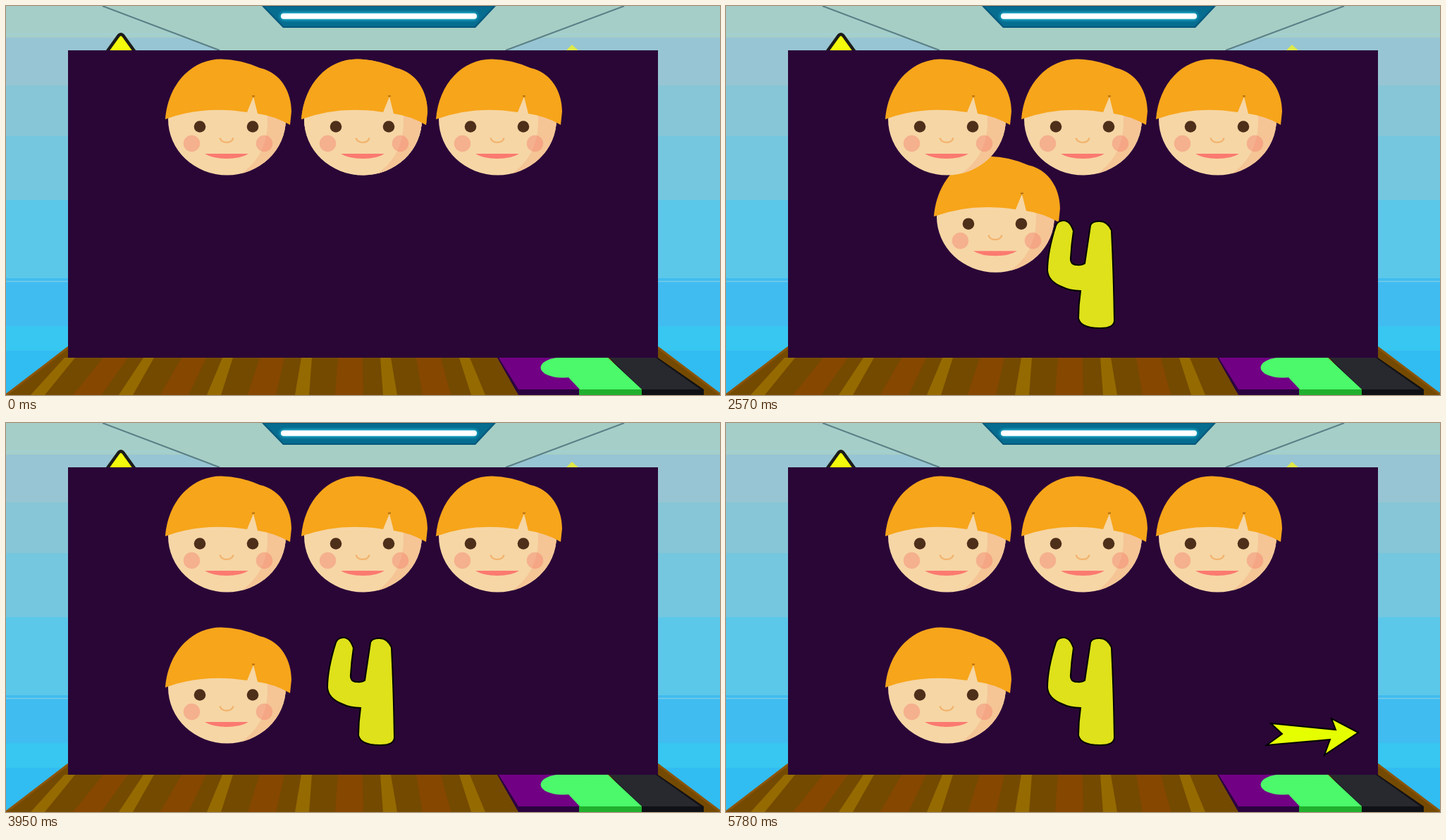
Write an HTML page that moves like this. It is 1013x553 px and loops after 6.58 s.

```html
<!DOCTYPE html>
<html lang="en">
<head>
<meta charset="utf-8">
<title>Counting faces</title>
<style>
  html, body { margin: 0; width: 100%; height: 100%; overflow: hidden; background: #2a0637; }
  svg { display: block; width: 100%; height: 100%; }
</style>
</head>
<body>
<svg viewBox="0 0 1013 553" preserveAspectRatio="none">
  <defs>
    <filter id="glow" x="-10%" y="-150%" width="120%" height="400%"><feGaussianBlur stdDeviation="2"/></filter>
    <clipPath id="skin"><path d="M240 130H387Q397 145 397 161A83.500 79.500 0 0 1 230 161Q230 145 240 130Z"/></clipPath>
    <g id="head">
      <g clip-path="url(#skin)">
        <path d="M226 120H401V245H226Z" fill="#f6d6a5"/>
        <path d="M371 100V165Q371 216 328 242H401V100Z" fill="#f5c596"/>
      </g>
      <path fill="#f7a51a" d="M226 161C230 110 264 75.500 305 75.500Q333 76 360 88C392 95 405 125 405 150L403 169Q380 156 357 153L351 129L342 151Q280 141 226 161Z"/>
      <path d="M349 128h4" stroke="#7a4a18"/>
      <g fill="#4e2f1a"><circle cx="275" cy="171.500" r="8.300"/><circle cx="350" cy="171.500" r="8.300"/></g>
      <g fill="#f5786a" fill-opacity=".4"><circle cx="263.500" cy="195.500" r="11.700"/><circle cx="366.500" cy="195.500" r="11.700"/></g>
      <path d="M303.500 187.500C306 196 320 196 322.500 187.500" fill="none" stroke="#f2b36d" stroke-width="2.400"/>
    </g>
  </defs>

  <g id="wall"></g>
  <path d="M137 0H877L709 63H303Z" fill="#a6cec5"/>
  <path d="M137 0L303 63M877 0L709 63" stroke="#5b7f86" stroke-width="2"/>
  <path d="M363 0H695L666 31H393Z" fill="#04587b"/>
  <path d="M367 1H691L665 29H394Z" fill="#066c90"/>
  <rect x="389" y="9.500" width="280" height="10" rx="5" fill="#25c5de" filter="url(#glow)"/>
  <rect x="390" y="10.500" width="278" height="8" rx="4" fill="#fff"/>
  <path d="M136 75L159 43Q163 37.500 167 43L190 75Z" fill="#f4fa0c" stroke="#1c1c1a" stroke-width="4.500"/>
  <path d="M793 65L803 55L814 65Z" fill="#dfe94a"/>

  <path d="M88 484L0 553H1013L925 484Z" fill="#744a00"/>
  <path d="M88 485.500L0 553M925 485.500L1013 552" stroke="#8a5408" stroke-width="3"/>
  <g id="planks"></g>
  <path d="M697 500L727 553H814V500Z" fill="#2b0340"/>
  <path d="M699 500L727 545H814L800 500Z" fill="#720084"/>
  <path d="M856 500H925L990 545V553H902Z" fill="#101116"/>
  <path d="M856 500H922L985 545H902Z" fill="#28292f"/>
  <path d="M813 545H902V553H813Z" fill="#20b02e"/>
  <path d="M783 500H854L902 545H814L798 528Z" fill="#4bf96a"/>
  <ellipse cx="790" cy="514" rx="31.500" ry="14.500" fill="#4bf96a"/>

  <rect x="88" y="63" width="837" height="437" fill="#2a0637"/>
  <g id="faces"></g>
  <path id="four" fill="#dfe11a" stroke="#000" stroke-width="2"/>
  <path id="arrow" stroke="#000" stroke-width="2"/>
</svg>
<script>
const byId = id => document.getElementById(id);
const clamp = v => Math.max(0, Math.min(1, v));
const LOOP = 6580, STEP = 30, PHASE = 20;

// Each band: top edge and colour, reaching down to the next one
const bands = [[0, '#a5cec8'], [45, '#97c5d3'], [113, '#86c6d6'], [185, '#74c7df'],
  [276, '#5bc8e9'], [387, '#40bcf0'], [455, '#37c7f0'], [490, '#31bcf2']];
byId('wall').innerHTML = bands.map(([y, color]) =>
  `<rect y="${y}" width="1013" height="${553 - y}" fill="${color}"/>`).join('') +
  '<path d="M0 40.500H1013M0 391.500H1013" stroke="#9bd5e2" stroke-opacity=".6" stroke-width="1.500"/>';

function plankRow(count, color, top, topGap, topWidth, bottom, bottomGap, bottomWidth) {
  let d = '';
  for (let i = 0; i < count; i++) {
    const a = top + topGap * i, b = bottom + bottomGap * i;
    d += `M${a} 500h${topWidth}L${b + bottomWidth} 553h${-bottomWidth}Z`;
  }
  return `<path d="${d}" fill="${color}"/>`;
}
byId('planks').innerHTML =
  plankRow(5, '#864700', 138, 111, 35, 95, 124, 40) +
  plankRow(6, '#956a00', 83, 112, 15, 35, 125, 20);

const mouthPath = open => {
  const top = 210 - 2 * open, low = 217 + 3.5 * open;
  return `M282 ${top + open}Q283 ${top} 286 ${top}H340Q343 ${top} 344 ${top + open}Q333 ${low} 313 ${low}Q293 ${low} 282 ${top + open}Z`;
};
// The travelling face comes first so that it passes behind the others
byId('faces').innerHTML = [193, 0, 193, 384].map(x =>
  `<g transform="translate(${x} 0)"><use href="#head"/><path d="${mouthPath(0)}" fill="#fb7a70"/></g>`).join('');
const [traveller, , middle] = byId('faces').children;

// Blends two paths that share the same commands
function mix(from, to, k) {
  const goal = to.match(/\d+/g);
  let i = 0;
  return from.replace(/\d+/g, n => (+n + (goal[i++] - n) * k).toFixed(2));
}
const fourNarrow = 'M484 305Q478 305 475 312Q468 345 468 372Q468 391 479 399Q488 405 504 406Q502 425 502 445Q505 458 527 458Q550 458 550 447Q550 380 547 319Q541 306 530 306Q519 306 517 312L509 366Q505 369 501 369Q493 369 494 358Q494 340 497 320Q492 305 484 305Z';
const fourWide = 'M479 305Q471 305 468 312Q456 350 456 376Q457 391 476 399Q488 405 503 405Q500 425 500 444Q503 458 531 458Q551 458 551 447Q550 380 547 319Q541 306 530 306Q519 306 517 312L509 366Q505 369 498 368Q488 368 489 358Q490 340 493 320Q488 305 479 305Z';
const arrowBent = 'M744 409C812 416 815 453 906 450L897 437L928 455L881 487L890 470C830 480 805 463 747 442L762 428Z';
const arrowStraight = 'M773 427C803 430 833 433 865 436L859 420L897 440L849 472L857 450C827 453 797 455 767 458L789 442Z';

function draw(time) {
  const t = Math.floor((time - PHASE) / STEP) * STEP + PHASE;

  const travel = clamp((t - 2030) / 840);
  traveller.setAttribute('transform', `translate(${193 * (1 - travel)} ${215 * travel})`);

  byId('four').setAttribute('d', mix(fourNarrow, fourWide, Math.min(1, (t - 2360) / 140)));
  byId('four').setAttribute('opacity', clamp((t - 2030) / 300));

  const open = clamp(1 - Math.abs(t - 3560) / 390);
  middle.lastChild.setAttribute('d', mouthPath(open));

  const k = clamp((t - 4940) / 840);
  const arrow = byId('arrow');
  arrow.setAttribute('d', mix(arrowBent, arrowStraight, k));
  arrow.setAttribute('fill', `rgb(${235 - 5 * k},255,${170 * (1 - k)})`);
  arrow.setAttribute('opacity', t < 4940 ? 0 : 0.09 + 0.91 * k);
}

function frame() {
  draw(performance.now() % LOOP);
  requestAnimationFrame(frame);
}
frame();
</script>
</body>
</html>
```
